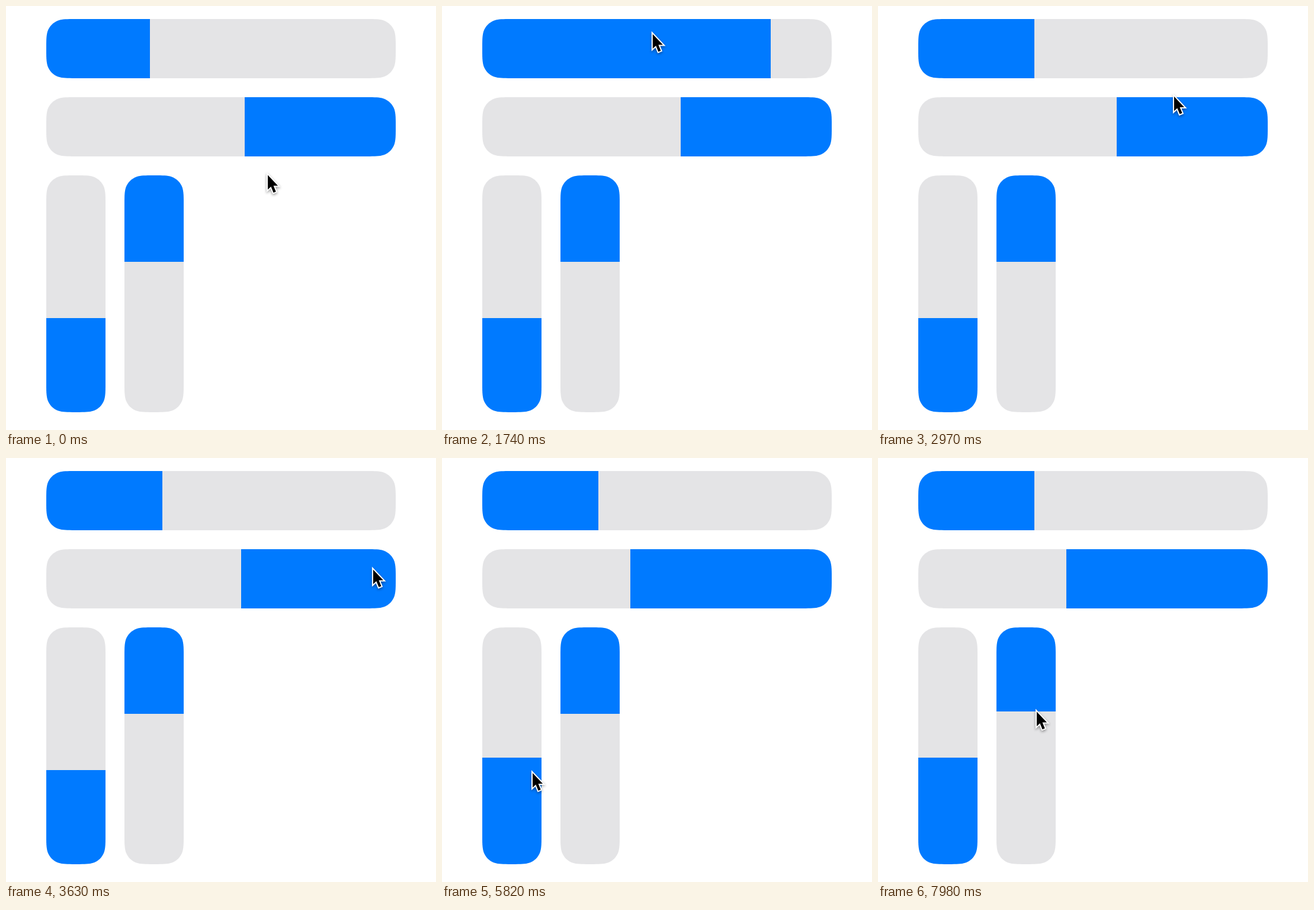
Write an HTML page with a canvas that moves like this. It is 726 px wide and 716 px high and loops after 8 s.

```html
<!DOCTYPE html>
<html lang="en">
<head>
<meta charset="utf-8">
<title>Sliders</title>
<style>
  html, body { margin: 0; width: 100%; height: 100%; overflow: hidden; background: #fff; }
  canvas { display: block; }
</style>
</head>
<body>
<canvas id="stage" width="726" height="716"></canvas>
<script>
const ctx = document.getElementById('stage').getContext('2d');
const LOOP = 8000, THICK = 100, RADIUS = 32, BLUE = '#007aff', GRAY = '#e4e4e6';
const DRAG_GAIN = 2; // the fill edge moves twice as far as the pointer

const linear = u => u;
const smooth = u => u * u * (3 - 2 * u);
const easeIn = u => u ** 3.5;
const easeOut = u => u * (2 - u);

function makeSlider(x, y, axis, length, edge, fillsFromStart) {
  const [w, h] = axis === 'x' ? [length, THICK] : [THICK, length];
  const colors = fillsFromStart ? [BLUE, GRAY] : [GRAY, BLUE];
  return { x, y, w, h, axis, length, edge, colors, path: smoothRect(x, y, w, h) };
}

const right = makeSlider(68, 22, 'x', 590, 243, true);
const left = makeSlider(68, 154, 'x', 590, 403.5, false);
const up = makeSlider(68, 286, 'y', 400, 527, false);
const down = makeSlider(200, 286, 'y', 400, 432, true);
const sliders = [right, left, up, down];

// Pointer strokes: when, where to, how, and the slider held meanwhile.
const home = { x: 442, y: 287 };
const strokes = [
  { start: 30, end: 810, x: 200, y: 64, ease: smooth },
  { start: 840, end: 1560, x: 379, y: 44, ease: easeOut, drag: right },
  { start: 1650, end: 2310, x: 210.5, y: 80, ease: linear, drag: right },
  { start: 2550, end: 3210, x: 623, y: 186, ease: smooth },
  { start: 3390, end: 3900, x: 580, y: 240, ease: easeIn, drag: left },
  { start: 4050, end: 4800, x: 153, y: 544, ease: smooth },
  { start: 5010, end: 5400, x: 153, y: 482, ease: smooth, drag: up },
  { start: 5400, end: 5820, x: 153, y: 533.5, ease: smooth, drag: up },
  { start: 6000, end: 6270, x: 268, y: 432, ease: smooth },
  { start: 6450, end: 6810, x: 268, y: 490, ease: smooth, drag: down },
  { start: 6810, end: 7170, x: 268, y: 443, ease: smooth, drag: down },
  { start: 7440, end: 7680, x: 268, y: 432, ease: smooth, drag: down },
  { start: 7950, end: 7980, x: 268, y: 430, ease: linear, drag: down }
];

// Pointer position and slider edges at time t.
function poseAt(t) {
  const pointer = { ...home };
  const edges = new Map(sliders.map(s => [s, s.edge]));
  for (const { start, end, x, y, ease, drag } of strokes) {
    if (t < start) break;
    const u = ease(Math.min(1, (t - start) / (end - start)));
    const move = { x: (x - pointer.x) * u, y: (y - pointer.y) * u };
    pointer.x += move.x;
    pointer.y += move.y;
    if (drag) edges.set(drag, edges.get(drag) + DRAG_GAIN * move[drag.axis]);
  }
  return { pointer, edges };
}

// Rounded rectangle with continuous-curvature corners.
function smoothRect(x, y, w, h) {
  const path = new Path2D();
  const curve = [[1.0885, 0, 0.8684, 0, 0.6315, 0.0749],
                 [0.3728, 0.1691, 0.1691, 0.3728, 0.0749, 0.6315],
                 [0, 0.8684, 0, 1.0885, 0, 1.5287]];
  const corners = [[x, y, 0, 1], [x, y + h, -1, 0], [x + w, y + h, 0, -1], [x + w, y, 1, 0]];
  for (const [cx, cy, sin, cos] of corners) {
    const place = (a, b) => [cx + RADIUS * (a * cos - b * sin), cy + RADIUS * (a * sin + b * cos)];
    path.lineTo(...place(1.5287, 0));
    for (const [a, b, c, d, e, f] of curve) {
      path.bezierCurveTo(...place(a, b), ...place(c, d), ...place(e, f));
    }
  }
  path.closePath();
  return path;
}

// A hard-stop gradient paints both colours with one clean outline.
function drawSlider({ x, y, w, h, axis, length, colors, path }, edge) {
  const paint = axis === 'x'
    ? ctx.createLinearGradient(x, y, x + w, y)
    : ctx.createLinearGradient(x, y, x, y + h);
  const split = Math.min(1, Math.max(0, (edge - (axis === 'x' ? x : y)) / length));
  for (const color of colors) paint.addColorStop(split, color);
  ctx.fillStyle = paint;
  ctx.fill(path);
}

const arrow = new Path2D('M0 -1.5V23L5.4 18.1L9.6 28.2L13.7 26.5L9.6 16.6H17.1Z');

function drawPointer({ x, y }) {
  ctx.save();
  ctx.translate(x, y);
  ctx.strokeStyle = '#fff';
  ctx.lineWidth = 4;
  ctx.shadowColor = 'rgba(0, 0, 0, 0.4)';
  ctx.shadowBlur = 4;
  ctx.shadowOffsetY = 2;
  ctx.stroke(arrow);
  ctx.shadowColor = 'transparent';
  ctx.fillStyle = '#000';
  ctx.fill(arrow);
  ctx.restore();
}

function render() {
  const { pointer, edges } = poseAt(performance.now() % LOOP);
  ctx.fillStyle = '#fff';
  ctx.fillRect(0, 0, 726, 716);
  for (const s of sliders) drawSlider(s, edges.get(s));
  drawPointer(pointer);
  requestAnimationFrame(render);
}
render();
</script>
</body>
</html>
```
